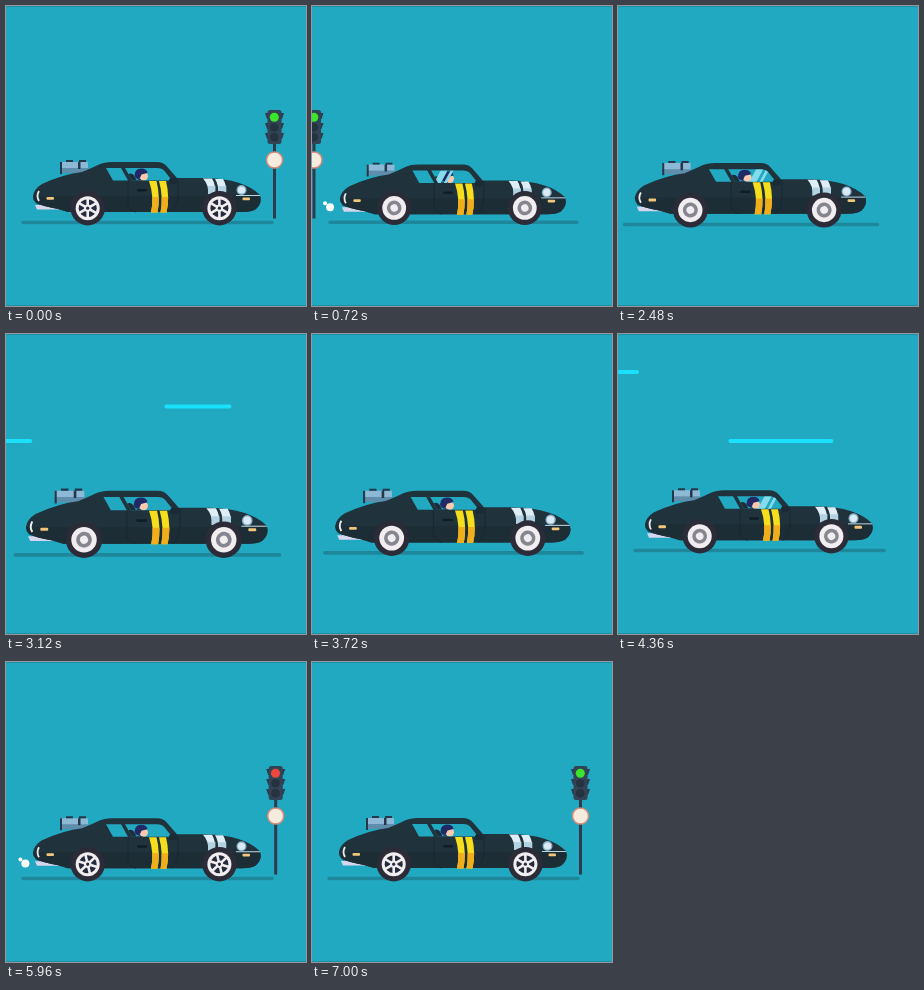
An HTML page for the animation above (7920 ms loop, 300 by 300 pixels).

```html
<!DOCTYPE html>
<html lang="en">
<head>
<meta charset="utf-8">
<title>Car leaving the lights</title>
<style>
html, body { margin: 0; height: 100%; overflow: hidden; background: #21a9c2; }
svg { display: block; width: 100vw; height: 100vh; }
</style>
</head>
<body>
<svg viewBox="0 0 300 300">
  <defs>
    <path id="pane" d="M119 161H151Q156 161 158.5 164L166 173.5H126Z"/>
    <clipPath id="glass"><use href="#pane"/></clipPath>
    <clipPath id="low"><rect x="140" y="190" width="25" height="17"/></clipPath>
    <g id="bands">
      <path d="M143 174H150.5Q154.5 190 151.5 205.5H145Q148.5 190 143 174Z"/>
      <path d="M153 174H160Q164 190 160.5 205.5H154.5Q157.5 190 153 174Z"/>
    </g>
    <g id="spokes">
      <circle r="9" fill="#252b3b"/>
      <path d="M0 -10V10M-8.7 -5L8.7 5M-8.7 5L8.7 -5" stroke="#f1edf0" stroke-width="2.6"/>
      <circle r="3.6" fill="#f1edf0"/><circle r="1.6" fill="#252b3b"/>
    </g>
    <g id="blur">
      <circle r="7.4" fill="#85868f"/><circle r="3.8" fill="#f1edf0"/>
    </g>
  </defs>
  <rect width="300" height="300" fill="#21a9c2"/>
  <path d="M0 .5H300M0 299.5H300" stroke="#1f8fa5"/>
  <g id="lines" stroke="#1be0fb" stroke-width="4" stroke-linecap="round"></g>

  <g id="signal">
    <path d="M268.5 136V212.5" stroke="#2c3b4e" stroke-width="3"/>
    <path d="M259 107H278L276 113H261ZM259 117H278L276 123H261ZM259 127H278L276 133H261Z" fill="#2c3b4e"/>
    <rect x="261.5" y="104" width="14" height="34" rx="2.5" fill="#324356"/>
    <circle id="lamp" cx="268.3" cy="111.3" r="4.5"/>
    <circle cx="268.3" cy="121.3" r="4.3" fill="#25323f"/>
    <circle cx="268.3" cy="131.3" r="4.3" fill="#25323f"/>
    <circle cx="268.5" cy="154" r="8" fill="#f5ece0" stroke="#d98b78" stroke-width="1.5"/>
  </g>

  <g id="car">
    <path d="M17 216.5H266" stroke="#1f879b" stroke-width="3.5" stroke-linecap="round"/>
    <g id="smoke" fill="#fff"><circle id="big"/><circle id="small"/></g>
    <g id="body">
      <path d="M29 198H56V202.5H31Z" fill="#d5d5ee"/>
      <rect x="54" y="155" width="28" height="7" rx="1" fill="#8db9d6"/>
      <path d="M54 161H82V166H54Z" fill="#5f8eac"/>
      <path d="M54 155H56V167H54ZM60 153H67V155H60ZM73 153H80V155H73ZM72 155H74.5V162H72Z" fill="#23384a"/>
      <path d="M27 189Q28 182 36 177Q58 167 76 165Q86 161 93 157.5Q98 155 106 155H151Q157 155 160.5 159L171 171H200Q238 172 254 188Q256.5 196 250 202Q246 205 236 205H62L52 202Q36 199 30 196Q27 193 27 189Z" fill="#20333c"/>
      <path d="M27 189H254Q256.5 196 250 202Q246 205 236 205H62L52 202Q36 199 30 196Q27 193 27 189Z" fill="#1c2d35"/>
      <path d="M100 161H115L122 173.5H107Z" fill="#22a9c2"/>
      <use href="#pane" fill="#22a9c2"/>
      <g clip-path="url(#glass)">
        <path d="M120 174L121.5 168Q125 165 128 168.5L131 174Z" fill="#1b2d38"/>
        <path d="M130 174Q132 171 136 172.5L139 174Z" fill="#2a2f50"/>
        <circle cx="137.8" cy="169.3" r="4.2" fill="#fbc9ad"/>
        <path d="M128.5 168Q129 161.5 135 161.5Q141 161.5 141.5 166L135.5 167.5L133.5 172Q128.5 172 128.5 168Z" fill="#222a66"/>
        <g id="shine" fill="#84dcea">
          <path d="M-2 160H5L-3 175H-10ZM8 160H11L3 175H0Z"/>
        </g>
      </g>
      <path d="M122 174V197Q123 203 130 205M172 172V188Q171 201 165 205" fill="none" stroke="#182832"/>
      <rect x="163" y="171" width="8" height="6" rx="2.5" fill="#1a2b35"/>
      <rect x="131" y="182" width="10" height="2.5" rx="1" fill="#101d26"/>
      <use href="#bands" fill="#f6de1c"/>
      <use href="#bands" fill="#f0ad1c" clip-path="url(#low)"/>
      <path d="M197 171.5H206Q210 178 209 187H202Q203 178 197 171.5ZM209 172H217Q221 178 220 187H212Q213 178 209 172Z" fill="#dfeef6"/>
      <path d="M202 179H209.5L209 187H202ZM212.5 179H220.3L220 187H212Z" fill="#b3d3e2"/>
      <circle cx="235.5" cy="183" r="5" fill="#86b4cd"/>
      <circle cx="235.5" cy="183" r="3.6" fill="#dcebf3"/>
      <path d="M230 188.5H254" stroke="#bcd5df"/>
      <path d="M33 184Q30 189 33 194" fill="none" stroke="#e9edf2" stroke-width="1.8"/>
      <rect x="40.5" y="190" width="7.5" height="2.8" rx="1" fill="#f3c77b"/>
      <rect x="236.5" y="190.5" width="7.5" height="2.8" rx="1" fill="#f3c77b"/>
    </g>
    <g id="wheels"></g>
  </g>
</svg>
<script>
const $ = id => document.getElementById(id);
const LOOP = 7920, STEP = 40, SPEED = 2.4;

// Streaks repeating every 1600 ms: entry time, height, length
const streaks = [
  [120, 25, 105], [210, 60, 67], [540, 25, 67], [610, 90, 105],
  [1000, 38, 105], [1081, 107, 105], [1274, 38, 105], [1378, 107, 67], [1461, 72.5, 67]
];
const zoomKeys = [[400, 1], [1600, .953], [3200, 1.062], [4300, 1]];
const shiftKeys = [[1600, 0], [2440, -8.5], [3120, 0]];
const dropKeys = [[400, 0], [1360, .9], [2480, .9], [3120, 0]];

$('lines').innerHTML = streaks.map(() => '<path/>').join('');
$('wheels').innerHTML = [81.7, 213.4].map(x =>
  `<g transform="translate(${x} 202.2)"><circle r="17.2" fill="#2b2c37"/>
   <circle r="12" fill="#f1edf0"/><use/></g>`).join('');
const rims = document.querySelectorAll('#wheels use');

const clamp = (v, a = 0, b = 1) => Math.min(b, Math.max(a, v));
const smooth = u => u * u * (3 - 2 * u);
const mod = (a, n) => ((a % n) + n) % n;
const set = (el, attrs) => { for (const k in attrs) el.setAttribute(k, attrs[k]); };
const show = (el, on) => set(el, { visibility: on ? 'visible' : 'hidden' });

function ease(keys, t) {
  if (t <= keys[0][0]) return keys[0][1];
  for (let i = 1; i < keys.length; i++) {
    const [a, v] = keys[i - 1], [b, w] = keys[i];
    if (t < b) return v + (w - v) * smooth((t - a) / (b - a));
  }
  return keys[keys.length - 1][1];
}

// Distance of the traffic light from its resting place
function signalShift(t) {
  if (t < 2000) return -290 * (Math.max(0, t - 20) / 720) ** 3;
  if (t < 5640) return 14 + SPEED * (5640 - t);
  return t < 6360 ? 14 * Math.exp((5640 - t) / 130) : 0;
}

function drawLines(t) {
  streaks.forEach(([start, y, len], i) => {
    const x = 300 - SPEED * mod(t - start, 1600);
    const line = $('lines').children[i];
    set(line, { d: `M${x + 2} ${y}H${x + len - 2}` });
    show(line, t > 800 && t < 5620 && x + len > 0);
  });
}

function drawSmoke(t) {
  const k = Math.floor((t - 500) / 660), start = 500 + k * 660;
  const u = (t - start) / 305, on = k >= 0 && u < 1 && start < 6000;
  show($('smoke'), on);
  if (!on) return;
  const side = k % 4 < 2 ? -1 : 1, x = 30 - 18 * u, y = 201.5;
  const r = 4 * clamp(Math.min(5 * u, 4 * (1 - u)));
  set($('big'), { cx: x, cy: y, r });
  set($('small'), { cx: x + 5 * side, cy: y + 4 * side, r: r / 2 });
}

function draw(t) {
  const zoom = ease(zoomKeys, t), away = signalShift(t);
  const x = 142 + ease(shiftKeys, t), y = 145 + ease(dropKeys, t);
  set($('car'), { transform: `translate(${x} ${y}) scale(${zoom}) translate(-142 -145)` });

  const power = clamp((t - 80) / 500) * clamp((6300 - t) / 500);
  const bob = 1.25 * power * (1 + Math.cos((t - 1360) / 320 * 2 * Math.PI));
  set($('body'), { transform: `translate(0 ${1 + bob})` });

  const fast = t > 480 && t < 5760;
  const turn = t < 2000 ? -away * 3.3 : -300 * clamp((6360 - t) / 600) ** 2;
  rims.forEach(rim => set(rim, { href: fast ? '#blur' : '#spokes', transform: `rotate(${turn})` }));

  const q = mod(t - 2480 + 940, 1880) - 940;
  set($('shine'), { transform: `translate(${149 - .15 * q} 0)` });
  show($('shine'), t > 100 && t < 5700);

  set($('signal'), { transform: `translate(${away} 0)` });
  set($('lamp'), { fill: t < 2000 || t >= 7000 ? '#3ce52c' : '#f0473d' });
  drawLines(t);
  drawSmoke(t);
}

function frame() {
  draw(Math.floor(performance.now() % LOOP / STEP) * STEP);
  requestAnimationFrame(frame);
}
frame();
</script>
</body>
</html>
```
